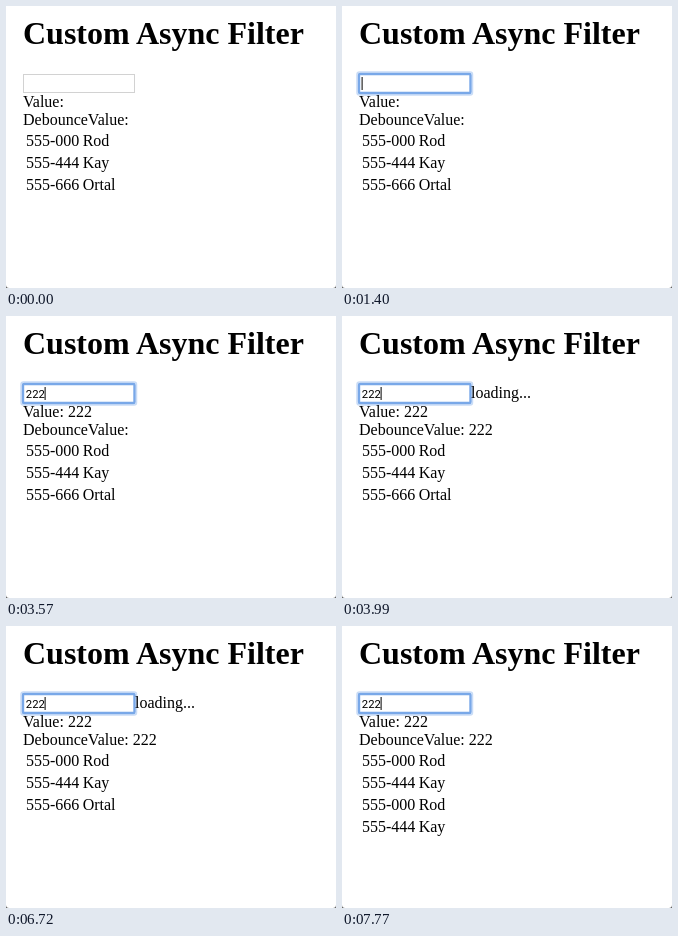
An HTML page for the animation above (8 s loop, 330 by 282 pixels).

```html
<!DOCTYPE html>
<html lang="en">
<head>
<meta charset="utf-8">
<title>Custom Async Filter</title>
<style>
  html, body { margin: 0; width: 100%; height: 100%; overflow: hidden; background: #fff; }
  svg { display: block; width: 330px; height: 282px; }
  text { font: 16px "Liberation Serif", "Times New Roman", serif; fill: #000; white-space: pre; }
  .title { font-size: 32px; font-weight: bold; }
  .typed { font: 11.3px Roboto, "Liberation Sans", sans-serif; }

  .focus, .key1, .key2, .key3, .debounced, .loading, .before, .after, .caret {
    animation: 8s step-end infinite;
  }
  .focus { animation-name: focus; }
  .key1 { animation-name: key1; }
  .key2 { animation-name: key2; }
  .key3 { animation-name: key3; }
  .debounced { animation-name: debounced; }
  .loading { animation-name: loading; }
  .before { animation-name: before; }
  .after { animation-name: after; }
  .caret { animation-name: blink, advance; }

  @keyframes focus { 0% { visibility: hidden } 17.5%, 100% { visibility: visible } }
  @keyframes key1 { 0% { visibility: hidden } 41.125%, 100% { visibility: visible } }
  @keyframes key2 { 0% { visibility: hidden } 42.875%, 100% { visibility: visible } }
  @keyframes key3 { 0% { visibility: hidden } 44.625%, 100% { visibility: visible } }
  @keyframes debounced { 0% { visibility: hidden } 49.875%, 100% { visibility: visible } }
  @keyframes loading {
    0%, 89.25%, 100% { visibility: hidden }
    49.875% { visibility: visible }
  }
  @keyframes before { 0% { visibility: visible } 89.25%, 100% { visibility: hidden } }
  @keyframes after { 0% { visibility: hidden } 89.25%, 100% { visibility: visible } }
  @keyframes blink {
    0%, 24.5%, 37.625%, 51.625%, 63.875%, 77%, 90.125% { visibility: hidden }
    17.5%, 30.625%, 41.125%, 57.75%, 70.875%, 84%, 97.125%, 100% { visibility: visible }
  }
  @keyframes advance {
    0% { transform: none }
    41.125% { transform: translateX(6.33px) }
    42.875% { transform: translateX(12.67px) }
    44.625%, 100% { transform: translateX(19px) }
  }
</style>
</head>
<body>
<svg viewBox="0 0 330 282">
  <path d="M0 279V282H3Q0 282 0 279M330 279V282H327Q330 282 330 279" fill="#555"/>

  <text class="title" x="17" y="38">Custom Async Filter</text>

  <rect x="17.5" y="68.5" width="111" height="18" fill="#fff" stroke="#d2d2d2"/>
  <g class="focus" fill="none">
    <rect x="15" y="66" width="115.5" height="23" rx="2.5" stroke="#c9dcf6" stroke-width="1.5"/>
    <rect x="17" y="68" width="111.5" height="19" rx="1" stroke="#79a8e8" stroke-width="2.4"/>
  </g>
  <text class="typed" x="19.8" y="82"><tspan class="key1">2</tspan><tspan class="key2">2</tspan><tspan class="key3">2</tspan></text>
  <rect class="caret" x="19.6" y="71" width="1" height="13"/>
  <text class="loading" x="129" y="82">loading...</text>

  <text x="17" y="101">Value: <tspan class="key1">2</tspan><tspan class="key2">2</tspan><tspan class="key3">2</tspan></text>
  <text x="17" y="119">DebounceValue: <tspan class="debounced">222</tspan></text>

  <text y="140"><tspan x="20">555-000</tspan><tspan x="76.7">Rod</tspan></text>
  <text y="162"><tspan x="20">555-444</tspan><tspan x="76.7">Kay</tspan></text>
  <text class="before" y="184"><tspan x="20">555-666</tspan><tspan x="76.7">Ortal</tspan></text>
  <g class="after">
    <text y="184"><tspan x="20">555-000</tspan><tspan x="76.7">Rod</tspan></text>
    <text y="206"><tspan x="20">555-444</tspan><tspan x="76.7">Kay</tspan></text>
  </g>
</svg>
</body>
</html>
```
